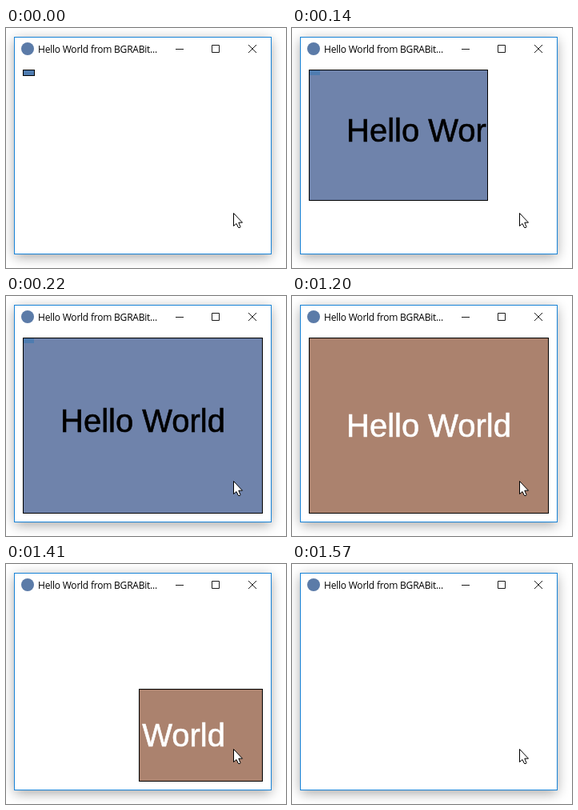
An HTML page that plays this animation: 350 px wide and 300 px high, repeating every 1.65 s.

```html
<!DOCTYPE html>
<html lang="en">
<head>
<meta charset="utf-8">
<title>Hello World</title>
<style>
  html, body { margin: 0; width: 100%; height: 100%; overflow: hidden; background: #fff; }
  svg { display: block; width: 350px; height: 300px; }
  .title { font: 12px "Open Sans", "Noto Sans", sans-serif; letter-spacing: -.22px; }
  .hello { font: 40px "Liberation Sans", Arial, sans-serif; text-anchor: middle; stroke-width: .6px; }
  .line { fill: none; stroke: #1c1c1c; }
</style>
</head>
<body>
<svg viewBox="0 0 350 300">
  <defs>
    <filter id="blur" x="-20%" y="-20%" width="140%" height="140%">
      <feGaussianBlur stdDeviation="8"/>
    </filter>
    <clipPath id="clip"><rect id="clipBox"/></clipPath>
  </defs>

  <rect x="11" y="15" width="320" height="271" opacity=".37" filter="url(#blur)"/>
  <rect x="10.5" y="11.5" width="321" height="271" fill="#fff" stroke="#1883d7"/>
  <circle cx="27" cy="26" r="8" fill="#5b7ba8"/>
  <text class="title" x="40" y="31">Hello World from BGRABit...</text>
  <path class="line" d="M212 26.5h10M257.5 21.5h9v9h-9z"/>
  <path class="line" d="M303 21l10 10M313 21l-10 10"/>

  <g id="panel">
    <rect id="box" stroke="#000"/>
    <rect id="spot" x="22" y="53" width="13" height="6" fill="#4f7cb0"/>
    <g clip-path="url(#clip)"><text id="hello" class="hello" x="171">Hello World</text></g>
  </g>

  <path d="M284.5 231.5v16l3.5-3 2.5 5h2l.5-1-2.2-5.3h4.7z" fill="#fff" stroke="#000"/>
</svg>
<script>
const LOOP = 1650, LEAVE = 1200;
const LEFT = 21, TOP = 52, WIDTH = 300, HEIGHT = 220;

// keys are [ms, share of full size]; the picture refreshes once per tick
const opening = {
  start: 20, tick: 24, min: [15, 8],
  keys: [[-4, 0], [140, .734], [212, 1]],
  fill: '#6f83ab', ink: '#000', drop: 8
};
const closing = {
  start: LEAVE, tick: 30, min: [0, 5],
  keys: [[LEAVE, 1], [1290, .78], [1380, .78], [1410, .517], [1560, 0]],
  fill: '#ab826e', ink: '#fff', drop: 14
};

const $ = id => document.getElementById(id);
const set = (id, attrs) => {
  for (const key in attrs) $(id).setAttribute(key, attrs[key]);
};
const mix = (a, b, k) => a + (b - a) * k;

function valueAt(keys, t) {
  const next = keys.findIndex(k => k[0] > t);
  if (next < 0) return keys[keys.length - 1][1];
  if (next === 0) return keys[0][1];
  const [t0, a] = keys[next - 1], [t1, b] = keys[next];
  return mix(a, b, (t - t0) / (t1 - t0));
}

function draw(t) {
  const leaving = t >= LEAVE;
  const { start, tick, min, keys, fill, ink, drop } = leaving ? closing : opening;
  const held = start + Math.floor((t - start) / tick) * tick;
  const size = valueAt(keys, held);
  const w = Math.round(mix(min[0], WIDTH, size));
  const h = Math.round(mix(min[1], HEIGHT, size));
  // opens from the top left, closes into the bottom right
  const x = leaving ? LEFT + WIDTH - w : LEFT;
  const y = leaving ? TOP + HEIGHT - h : TOP;

  set('panel', { display: w ? 'inline' : 'none' });
  set('box', { x: x + .5, y: y + .5, width: Math.max(0, w - 1), height: Math.max(0, h - 1), fill });
  set('spot', { display: leaving ? 'none' : 'inline' });
  set('clipBox', { x, y, width: w, height: h });
  set('hello', { y: Math.floor(y + h / 2) + drop, fill: ink, stroke: ink });
}

const begin = performance.now();
function frame() {
  draw((performance.now() - begin) % LOOP);
  requestAnimationFrame(frame);
}
frame();
</script>
</body>
</html>
```
